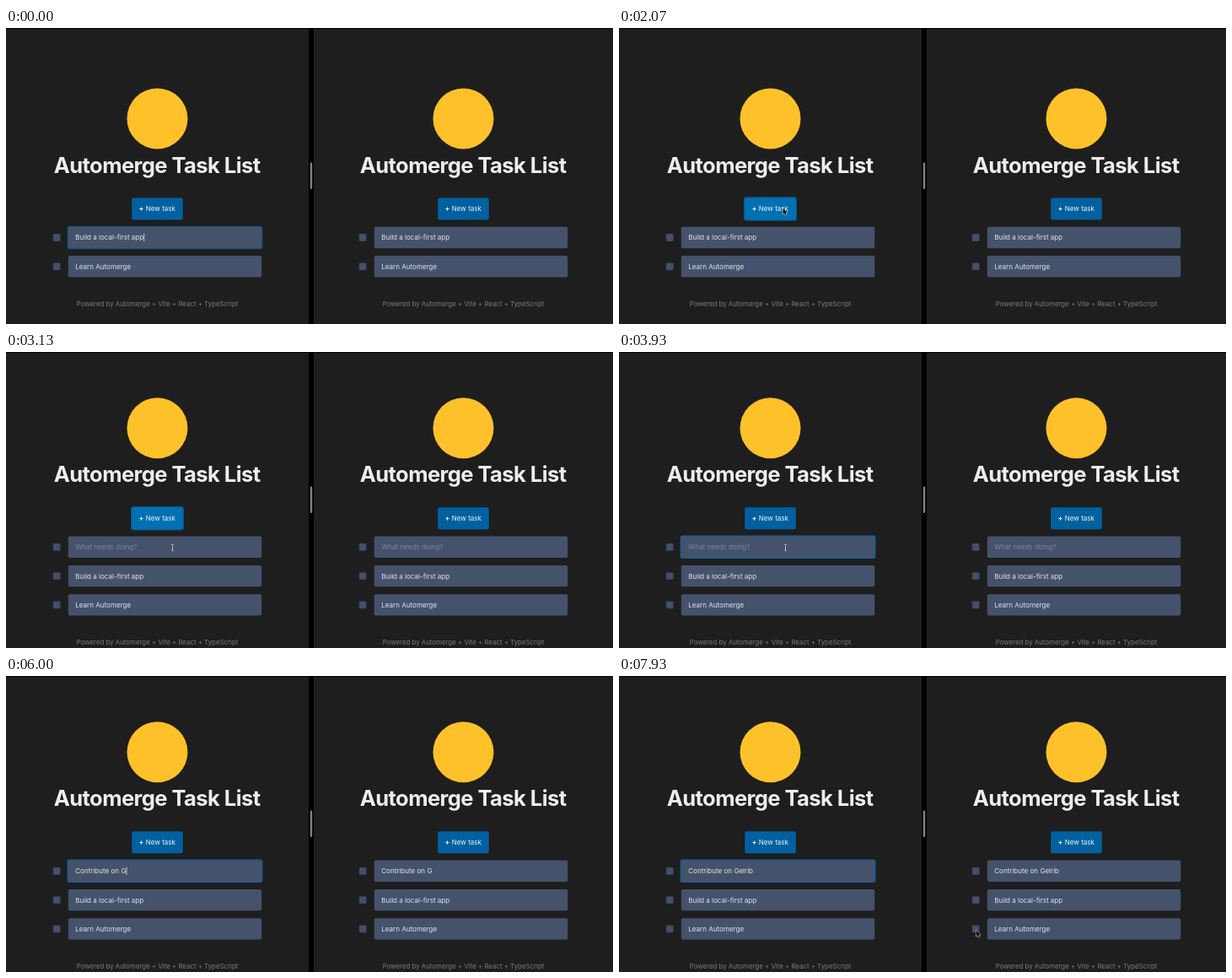
An HTML page with a canvas for the animation above (8000 ms loop, 720 px wide and 351 px high).

```html
<!DOCTYPE html>
<html lang="en">
<head>
<meta charset="utf-8">
<title>Automerge Task List</title>
<style>
  html, body { margin: 0; width: 100%; height: 100%; overflow: hidden; background: #1e1e1e; }
  canvas { display: block; width: 720px; height: 351px; }
</style>
</head>
<body>
<canvas id="stage"></canvas>
<script>
const W = 720, H = 351, LOOP = 8000;
const PANE = 363, SHIFT = 17.2, PITCH = 34.3;
const ADDED = 2130, FOCUS_BUTTON = 1900, FOCUS_INPUT = 3400;
const TYPE_START = 4200, TYPE_STEP = 122;
const NEW_TASK = 'Contribute on Gelrib';
const FONT = 'Inter, "Open Sans", sans-serif';
const COLOR = {
  bg: '#1e1e1e', field: '#45526c', box: '#42506c', edge: '#384661',
  text: '#dfe3ea', hint: '#7d879b', button: '#0161a0', hover: '#0171b3',
  ring: '#0465a6', sign: '#ffc129', title: '#ededed', foot: '#7b7b7b'
};

// Pointer paths: time, x, y
const PATHS = [
  [[530, 204, 118], [980, 196, 219], [1500, 196, 219], [1850, 194.5, 213.5],
   [2400, 194.5, 213.5], [2850, 197.5, 232], [TYPE_START, 197.5, 232]],
  [[6700, 197.5, 232], [7380, 424, 306], [7560, 424, 306], [7800, 423.5, 301.3], [LOOP, 423.5, 301.3]]
];

const canvas = document.getElementById('stage');
const ctx = canvas.getContext('2d');
const dpr = window.devicePixelRatio || 1;
canvas.width = W * dpr;
canvas.height = H * dpr;

const ease = u => u * u * (3 - 2 * u);
const within = (t, a, b) => t >= a && t < b;

function roundRect(x, y, w, h, r, fill) {
  ctx.beginPath();
  ctx.roundRect(x, y, w, h, r);
  ctx.fillStyle = fill;
  ctx.fill();
}

function label(str, x, y, color, { size = 8, weight = 400, align = 'left', spacing = 0 } = {}) {
  ctx.font = `${weight} ${size}px ${FONT}`;
  ctx.letterSpacing = spacing + 'px';
  ctx.textAlign = align;
  ctx.fillStyle = color;
  ctx.fillText(str, x, y);
}

function pointerAt(t) {
  for (const path of PATHS) {
    for (let i = 1; i < path.length; i++) {
      const [t0, x0, y0] = path[i - 1], [t1, x1, y1] = path[i];
      if (within(t, t0, t1)) {
        const u = ease((t - t0) / (t1 - t0));
        return { x: x0 + (x1 - x0) * u, y: y0 + (y1 - y0) * u };
      }
    }
  }
  return null;
}

function stateAt(t) {
  const added = t >= ADDED;
  const count = Math.floor((t - TYPE_START) / TYPE_STEP) + 1;
  const typed = NEW_TASK.slice(0, Math.max(0, count));
  const tasks = ['Build a local-first app', 'Learn Automerge'];
  if (added) tasks.unshift(typed);
  const caret = t < 560 || within(t, FOCUS_INPUT, 3900) || within(t, TYPE_START, 7030) || within(t, 7430, 7880);
  return {
    tasks, caret,
    dy: added ? -SHIFT : 0,
    hover: within(t, 900, FOCUS_INPUT),
    buttonFocus: within(t, FOCUS_BUTTON, FOCUS_INPUT),
    inputFocus: t < FOCUS_BUTTON || t >= FOCUS_INPUT,
    ringAlpha: t < FOCUS_BUTTON ? 0.75 : 1
  };
}

function drawTask(text, y, focused, s) {
  roundRect(55.8, y - 4.4, 8.8, 8.8, 1.2, COLOR.edge);
  roundRect(56.5, y - 3.7, 7.4, 7.4, 0.8, COLOR.box);
  if (focused) {
    ctx.globalAlpha = s.ringAlpha;
    roundRect(72.6, y - 13.8, 231.8, 27.6, 3, COLOR.ring);
    ctx.globalAlpha = 1;
  }
  roundRect(73.8, y - 12.7, 229.4, 25.4, 2, COLOR.field);
  label(text || 'What needs doing?', 82.2, y + 2.9, text ? COLOR.text : COLOR.hint, { size: 8.05 });
  if (focused && s.caret) {
    const x = 82.4 + ctx.measureText(text).width;
    ctx.fillStyle = COLOR.text;
    ctx.fillRect(x, y - 4.8, 0.8, 9.4);
  }
}

function drawPane(x, s, active) {
  ctx.save();
  ctx.translate(x, s.dy);
  ctx.beginPath();
  ctx.arc(179.5, 107.4, 36, 0, Math.PI * 2);
  ctx.fillStyle = COLOR.sign;
  ctx.fill();

  label('Automerge Task List', 179.1, 171.6, COLOR.title,
    { size: 25.6, weight: 700, align: 'center', spacing: -0.6 });

  if (active && s.buttonFocus) roundRect(148, 200.3, 63, 28.4, 3.5, '#0a568a');
  roundRect(149.2, 201.5, 60.6, 26, 2.5, active && s.hover ? COLOR.hover : COLOR.button);
  label('+', 157.8, 217.3, '#fff', { weight: 700 });
  label('New task', 165.8, 217.3, '#f2f6fa');

  s.tasks.forEach((task, i) => drawTask(task, 248.5 + i * PITCH, active && s.inputFocus && i === 0, s));
  label('Powered by Automerge + Vite + React + TypeScript', 179.5, 261.7 + s.tasks.length * PITCH, COLOR.foot,
    { size: 7.87, align: 'center' });
  ctx.restore();
}

function outline(d, fill, stroke, width) {
  const p = new Path2D(d);
  ctx.lineJoin = 'round';
  ctx.lineWidth = width;
  ctx.strokeStyle = stroke;
  ctx.stroke(p);
  if (fill) {
    ctx.fillStyle = fill;
    ctx.fill(p);
  }
}

const cursors = {
  arrow() {
    outline('M0 0V7.4L1.7 5.9L2.9 8.7L4.2 8.1L3 5.4H5.3Z', '#000', '#fff', 1);
  },
  hand() {
    outline('M-.6 .5Q0 -.4 .6 .5V3L4 3.8Q5 4.2 4.7 5.5L4 8.6H.4L-1.9 5.4Q-1.6 4.3 -.6 5Z', '#fff', '#111', 0.9);
  },
  beam() {
    const d = 'M-1.7 -4Q0 -4 0 -3Q0 -4 1.7 -4M0 -3V3M-1.7 4Q0 4 0 3Q0 4 1.7 4M-.9 .9H.9';
    outline(d, null, '#222', 1.6);
    outline(d, null, '#e8e8e8', 0.8);
  }
};

function cursorKind(p, t, s) {
  const overButton = p.x > 149 && p.x < 210 && p.y > 201 + s.dy && p.y < 228 + s.dy;
  if (overButton && t < 1800) return 'hand';
  const x = p.x >= PANE ? p.x - PANE : p.x;
  const overField = x > 73 && x < 304 &&
    s.tasks.some((_, i) => Math.abs(p.y - (248.5 + s.dy + i * PITCH)) < 13);
  return overField ? 'beam' : 'arrow';
}

function draw(t) {
  const s = stateAt(t);
  ctx.setTransform(dpr, 0, 0, dpr, 0, 0);
  ctx.fillStyle = COLOR.bg;
  ctx.fillRect(0, 0, W, H);
  drawPane(0, s, true);
  drawPane(PANE, s, false);

  ctx.fillStyle = '#000';
  ctx.fillRect(0, 0, W, 0.8);
  ctx.fillRect(359, 0, 6, H);
  roundRect(360.8, 159.5, 2.4, 31.5, 1.2, '#828282');

  const p = pointerAt(t);
  if (p) {
    ctx.save();
    ctx.translate(p.x, p.y);
    cursors[cursorKind(p, t, s)]();
    ctx.restore();
  }
}

const start = performance.now();
function tick() {
  draw((performance.now() - start) % LOOP);
  requestAnimationFrame(tick);
}
tick();
</script>
</body>
</html>
```
